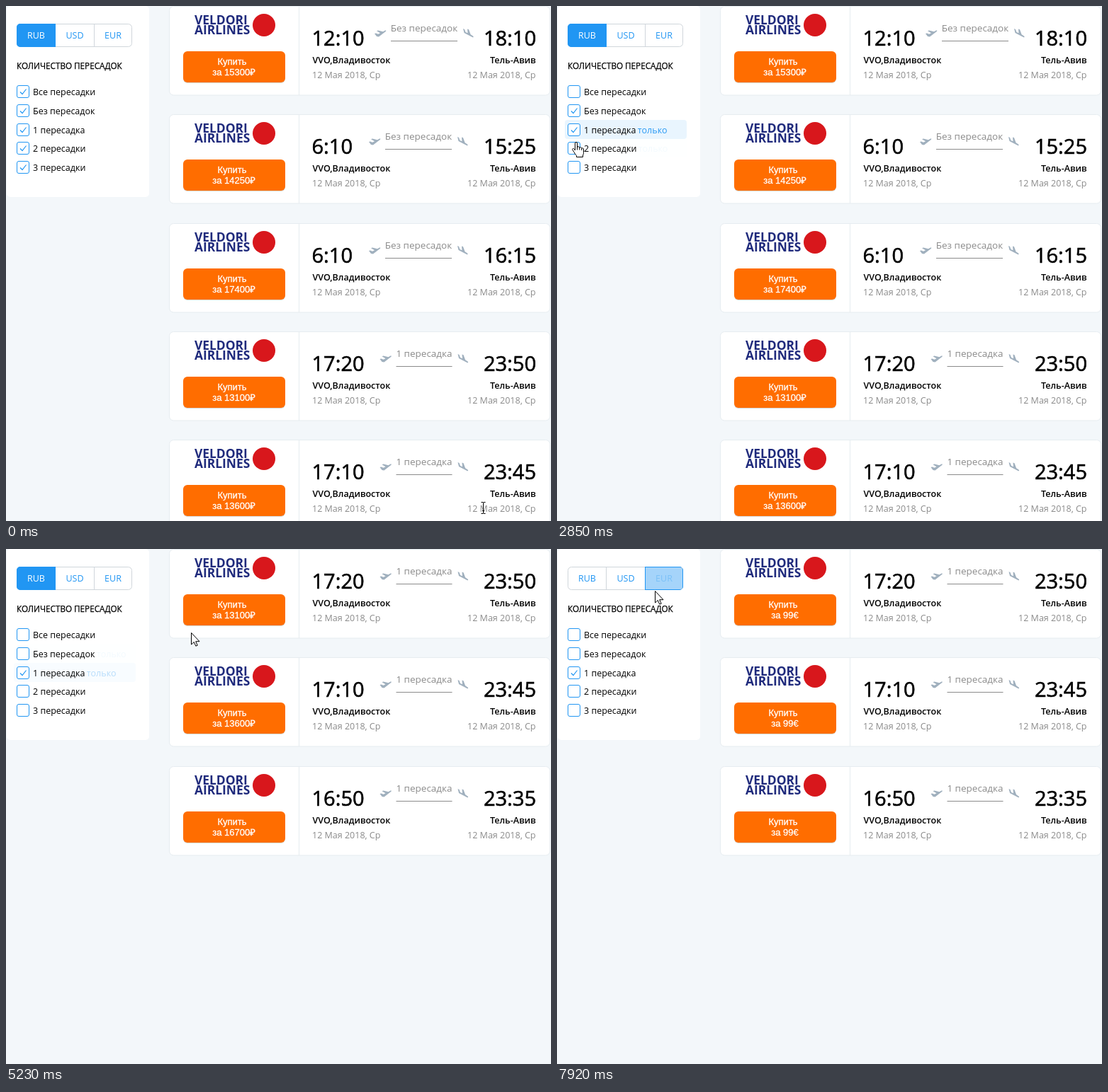
An HTML page that plays this animation: 769 by 728 pixels, repeating every 8 s.

```html
<!DOCTYPE html>
<html lang="ru">
<head>
<meta charset="utf-8">
<title>Билеты</title>
<style>
html, body { margin: 0; width: 100%; height: 100%; overflow: hidden; background: #f3f7fa; }
svg { display: block; font: 12.5px "Open Sans", "Noto Sans", sans-serif; }
.mid { text-anchor: middle; }
.end { text-anchor: end; }
.head { font-size: 11.7px; stroke: #000; stroke-width: .25; }
.time { font-size: 29px; stroke: #000; stroke-width: .6; }
.city { font-weight: 600; }
.grey { fill: #8b8b8b; }
.stops { font-size: 13.5px; }
.brand { font-size: 17.4px; font-weight: 700; fill: #1f2a7c; }
.buy { font: 13px "Liberation Sans", Arial, sans-serif; fill: #fff; stroke: #fff; stroke-width: .3; }
</style>
</head>
<body>
<svg id="stage" width="769" height="728" viewBox="0 0 769 728"></svg>
<script>
const LOOP = 8000, FADE = 200, BLUE = '#2196f3';
const stage = document.getElementById('stage');

const stopNames = ['Без пересадок', '1 пересадка', '2 пересадки', '3 пересадки'];
const rowNames = ['Все пересадки', ...stopNames];
const currencies = ['RUB', 'USD', 'EUR'];
// departure, arrival and price, grouped by number of stops
const flights = [
  ['12:10 18:10 15300', '6:10 15:25 14250', '6:10 16:15 17400'],
  ['17:20 23:50 13100', '17:10 23:45 13600', '16:50 23:35 16700'],
  [],
  ['16:20 22:10 12400', '12:10 20:15 13400', '9:40 19:25 12450']
].flatMap((group, stops) => group.map(line => [stops, ...line.split(' ')]));

// Layout
const cardY = i => Math.round(153.3 * i);
const rowY = i => Math.round(121 + 26.8 * i);
const tabX = i => 15.5 + Math.min(162, Math.round(54.3 * i));
const rowBox = i => [11, rowY(i) - 14, 172, 27];
const buyBox = i => [250, 64 + cardY(i), 144, 44];
const tabBox = [15, 25, 163, 33];

// Spots the pointer visits; press() changes the page state
const spot = (x, y, press) => ({ x, y, press });
const check = i => spot(27, rowY(i), s => {
  s.ticks = s.ticks.map((v, j) => i === 0 ? !s.ticks[0] : j === i ? !v : j > 0 && v);
});
const only = i => spot(140, rowY(i), s => { s.ticks = s.ticks.map((_, j) => j === i); });
const buy = (i, x = 322) => spot(x, 90 + cardY(i));
const tab = i => spot((tabX(i) + tabX(i + 1)) / 2, 42, (s, t) => { s.currency = i; s.since = t; });

const start = spot(673, 709);
// leave time, travel time, spot, press time
const moves = [
  [20, 830, check(1)],
  [900, 250, check(0), 1295],
  [1520, 90, check(1), 2000],
  [2600, 100, check(2), 2750],
  [2825, 90, check(3), 3050],
  [3250, 600, only(4), 3900],
  [4165, 705, only(2), 4880],
  [5060, 560, buy(0)],
  [5753, 467, buy(1, 334)],
  [6386, 440, buy(2, 304)],
  [6850, 500, tab(1), 7300],
  [7450, 200, tab(2), 7840],
  [7875, 140, spot(132, 66)]
];

const easeOut = k => 1 - (1 - k) ** 3;

function pointer(t) {
  let { x, y } = start;
  for (const [leave, travel, to] of moves) {
    if (t < leave) break;
    const k = easeOut(Math.min(1, (t - leave) / travel));
    x += (to.x - x) * k;
    y += (to.y - y) * k;
  }
  return [x, y];
}

function pageState(t) {
  const s = { ticks: rowNames.map(() => true), currency: 0, since: -FADE };
  for (const [, , to, when] of moves) if (t >= when) to.press(s, when);
  return s;
}

const inside = ([x, y], [l, t, w, h]) => x >= l && x < l + w && y >= t && y < t + h;

// Share of the last FADE ms spent over a box: a linear fade in and out
function glow(box, t) {
  let n = 0;
  for (let k = 0; k < 20; k++) n += inside(pointer(t - k * FADE / 20), box);
  return n / 20;
}

const mix = (to, from, k) => `color-mix(in srgb, ${to} ${(k * 100).toFixed(1)}%, ${from})`;
const text = (x, y, cls, s, fill) =>
  `<text x="${x}" y="${y}" class="${cls}"${fill ? ` style="fill:${fill}"` : ''}>${s}</text>`;
const rect = ([x, y, w, h], r, attrs) =>
  `<rect x="${x}" y="${y}" width="${w}" height="${h}" rx="${r}" ${attrs}/>`;
const shape = (x, y, d, attrs) => `<path transform="translate(${x} ${y})" d="${d}" ${attrs}/>`;

function tabs({ currency, since }, t) {
  const k = Math.min(1, (t - since) / FADE), x = tabX(currency);
  return `<clipPath id="round">${rect(tabBox, 5, '')}</clipPath>` +
    rect([15.5, 25.5, 162, 32], 5, 'fill="#fff" stroke="#d0d6db"') +
    `<path d="M${tabX(1)} 26v31M${tabX(2)} 26v31" stroke="#d0d6db"/>` +
    rect([x, 25.5, tabX(currency + 1) - x, 32], 0,
      `clip-path="url(#round)" fill="${BLUE}" fill-opacity="${k}" stroke="${BLUE}"`) +
    currencies.map((name, i) =>
      text(tab(i).x, 46, 'mid', name, i === currency ? mix('#fff', BLUE, k) : BLUE)).join('');
}

function row(i, ticked, t) {
  const y = rowY(i), k = glow(rowBox(i), t);
  const link = i && k ? `<tspan dx="2.5" fill="${BLUE}" fill-opacity="${k}">только</tspan>` : '';
  return rect(rowBox(i), 4, `fill="#e8f5fe" opacity="${k}"`) +
    rect([15.5, y - 8.5, 17, 17], 2.5, `fill="#fff" stroke="${BLUE}"`) +
    (ticked ? shape(24, y, 'M-4 .5l3 3 5.5-7', `fill="none" stroke="${BLUE}" stroke-width="1.2"`) : '') +
    text(38, y + 4.5, '', rowNames[i] + link);
}

const takeoff = 'M0 5l2-.6 3 1.3 3-1.5-5-3 2-.7 7 1.7 3-1.6q2.2-.5 1 1.2L6 9.5 3 9z';
const landing = 'M0 0l2 1 1.5 4 3 1.2-.5-5.7 2 .8 2.6 6.9 3.4 2.3q1.5 2-.6 1.8L1.5 6z';

function card([stops, from, to, price], i, currency, t) {
  const cost = [price + '₽', '120$', '99€'][currency];
  const mid = from.length > 4 ? 590 : 582, half = stops ? 39.5 : 47;
  const [x, y, w, h] = buyBox(0), k = glow(buyBox(i), t);
  return `<g transform="translate(0 ${cardY(i)})">` +
    rect([230.5, .5, 537, 125.5], 6, 'fill="#fff" stroke="#e6ecf0"') +
    '<path d="M413.5 1v125" stroke="#e6ecf0"/>' +
    text(266, 26, 'brand', 'VELDORI') + text(266, 39.5, 'brand', 'AIRLINES') +
    '<circle cx="364" cy="27" r="16" fill="#d8171c"/>' +
    rect([x, y + 1, w, h], 6, 'fill="#000" opacity=".16"') +
    rect([x, y, w, h], 6, `style="fill:${mix('#ff8d39', '#ff6d00', k)}"`) +
    text(319, 83, 'buy mid', 'Купить') + text(321.5, 97.5, 'buy mid', 'за ' + cost) +
    text(431.5, 56, 'time', from) + text(748, 56, 'time end', to) +
    text(432.5, 81, 'city', 'VVO,Владивосток') + text(747.5, 81, 'city end', 'Тель-Авив') +
    text(432, 101.5, 'grey', '12 Мая 2018, Ср') + text(747.5, 101.5, 'grey end', '12 Мая 2018, Ср') +
    text(mid, 36, 'grey stops mid', stopNames[stops]) +
    `<path d="M${mid - half} 49.5h${2 * half}" stroke="#8b8b8b"/>` +
    shape(mid - half - 23, 34, takeoff, 'fill="#a0b0be"') +
    shape(mid + half + 8, 32, landing, 'fill="#a0b0be"') + '</g>';
}

const hand = 'M-2 1.5Q-2 0-.5 0T1 1.5V7.5Q1 6 2.7 6.2T4.2 8Q4.5 7 6 7.3T7.3 9Q7.6 8.2 9 8.5T10 10.5' +
  'V15Q10 17 9 18.5V21H0V19Q-2 17-3.5 14L-5.5 11Q-6 9.5-5 9T-3 10L-2 11.5ZM1 7.5V11M4.2 8V11M7.3 9V11.5';
const arrow = 'M0 0V16.5L3.8 13 6.3 18.7 8.7 17.7 6.2 12.2H11.5Z';
const beam = 'M-3-8h2.5l.5.5.5-.5H3M0-7.5V7.5M-3 8h2.5l.5-.5.5.5H3M-1.5 4h3';

function cursor(t, count) {
  const p = pointer(t);
  const targets = [tabBox, ...rowNames.map((_, i) => rowBox(i))];
  for (let i = 0; i < count; i++) targets.push(buyBox(i));
  const overDate = count > 4 && inside(p, [652, 700, 96, 20]);
  const d = targets.some(b => inside(p, b)) ? hand : overDate ? beam : arrow;
  return shape(Math.round(p[0]) + .5, Math.round(p[1]) + .5, d, 'fill="#fff" stroke="#000"');
}

function render(t) {
  const state = pageState(t);
  const shown = flights.filter(([stops]) => state.ticks[stops + 1]).slice(0, 5);
  return rect([1, 0, 201, 270], 5, 'fill="#fff"') + tabs(state, t) +
    text(15, 89, 'head', 'КОЛИЧЕСТВО ПЕРЕСАДОК') +
    rowNames.map((_, i) => row(i, state.ticks[i], t)).join('') +
    shown.map((f, i) => card(f, i, state.currency, t)).join('') +
    cursor(t, shown.length);
}

let last = '';
function frame() {
  const html = render(performance.now() % LOOP);
  if (html !== last) stage.innerHTML = last = html;
  requestAnimationFrame(frame);
}
frame();
</script>
</body>
</html>
```
